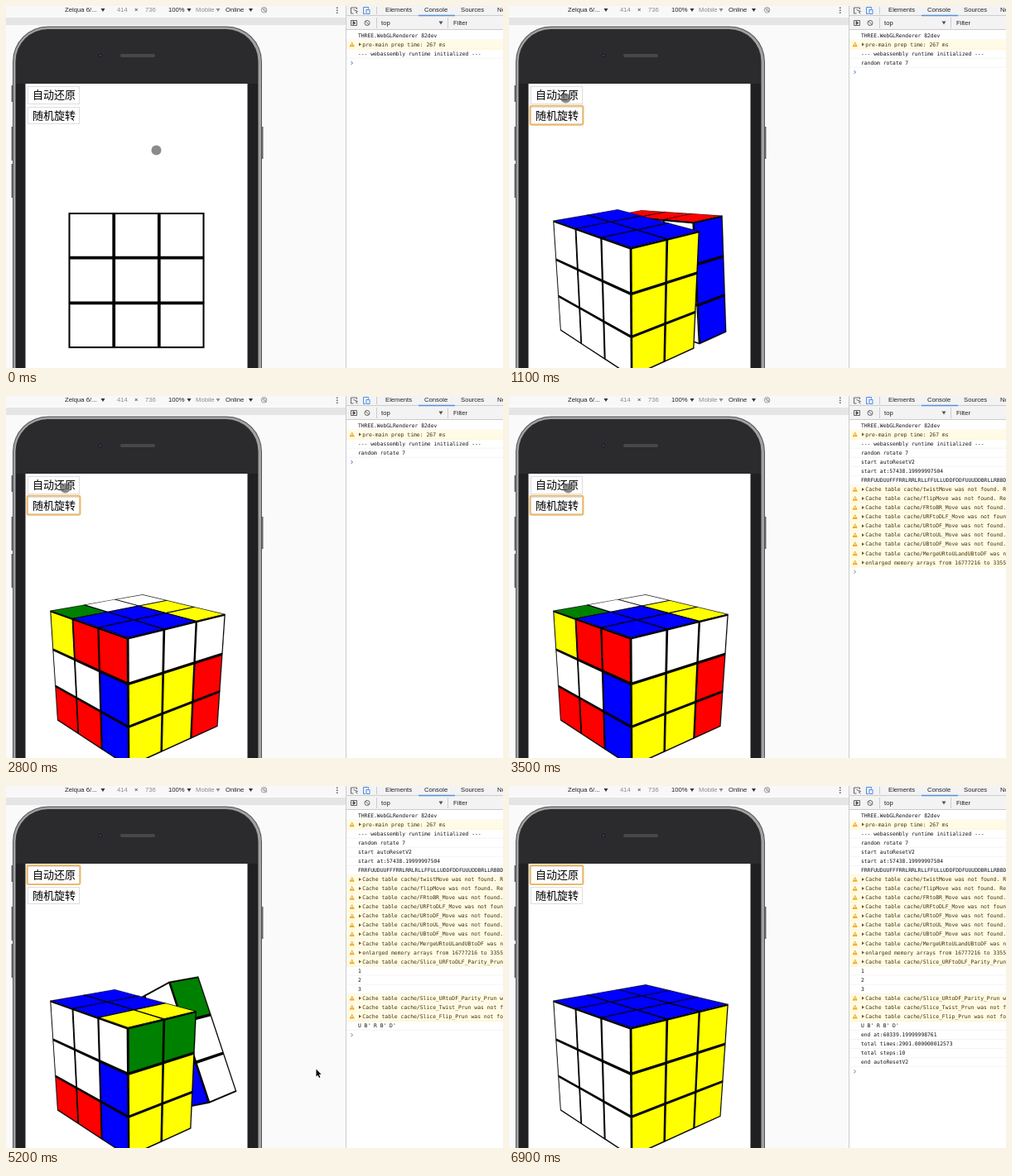
Recreate the animation shown at these times as an HTML page with a canvas. Size 600 by 438 pixels, loop 7 s.

```html
<!DOCTYPE html>
<html lang="zh">
<head>
<meta charset="utf-8">
<style>
html, body { margin: 0; width: 100%; height: 100%; overflow: hidden; background: #fff; }
svg, canvas { position: absolute; left: 0; top: 0; width: 600px; height: 438px; }
text { font: 7.7px "Liberation Sans", Arial, sans-serif; fill: #222; white-space: pre; }
#rows text { font: 6.34px "DejaVu Sans Mono", monospace; fill: #111; }
#rows .warn text { font-size: 6.42px; fill: #453000; }
.cn text { font: 13px "Noto Sans CJK SC", "Noto Sans CJK", sans-serif; fill: #000; text-anchor: middle; }
text.dim { fill: #8c8c8c; }
</style>
</head>
<body>
<svg viewBox="0 0 600 438">
  <rect width="410" height="438" fill="#fafafa"/>
  <rect width="410" height="12" fill="#f8f8f8"/>
  <rect y="14" width="410" height="9" fill="#e5e5e5"/>
  <text x="71" y="7.2">Zelqua 6/...</text>
  <text x="134" y="7.2" class="dim">414</text>
  <text x="155" y="7.2">×</text>
  <text x="168" y="7.2" class="dim">736</text>
  <text x="196" y="7.2">100%</text>
  <text x="229" y="7.2" class="dim">Mobile</text>
  <text x="265" y="7.2">Online</text>
  <path d="M114.500 3h5l-2.500 4zM218.500 3h5l-2.500 4zM293 3h5l-2.500 4z" fill="#333"/>
  <path d="M253.500 3h5l-2.500 4z" fill="#8c8c8c"/>
  <g fill="none" stroke="#888" stroke-width=".8"><circle cx="311.500" cy="4.800" r="3.300"/><path d="M309 2l5.500 5.500M310 4.500l2-2 2 2-2 2z"/></g>
  <path d="M399 1.500h1.500v1.500h-1.500zM399 4.500h1.500v1.500h-1.500zM399 7.500h1.500v1.500h-1.500z" fill="#555"/>

  <path d="M6.500 96h3v20h-3zM6.500 146h3v41h-3zM6.500 191h3v41h-3zM307 146h3.500v39h-3.500z" fill="#666"/>
  <rect x="8" y="24.500" width="301" height="520" rx="43" fill="#555"/>
  <rect x="9" y="25.500" width="299" height="520" rx="42" fill="#a2a2a4"/>
  <rect x="11.500" y="28" width="293" height="520" rx="39" fill="#2b2b2d"/>
  <rect x="12" y="94" width="292" height="344" fill="#202022"/>
  <rect x="138" y="58" width="42" height="4" rx="2" fill="#484848"/>
  <circle cx="114" cy="60" r="2.200" fill="#1c1c26"/><circle cx="114" cy="60" r="1" fill="#4a4a90"/>
  <rect x="23.500" y="94" width="268" height="344" fill="#fff"/>
  <g class="cn">
    <rect x="26.500" y="97.500" width="62" height="21" fill="#fff" stroke="#ddd"/>
    <rect x="26.500" y="122.500" width="62" height="20" fill="#fff" stroke="#ddd"/>
    <rect id="focus" x="25.500" width="64" height="23" rx="2" fill="none" stroke="#ebba68" stroke-width="2"/>
    <text x="58" y="112.300">自动还原</text>
    <text x="58" y="136.500">随机旋转</text>
  </g>

  <rect x="411" width="189" height="438" fill="#fff"/>
  <rect x="411" width="189" height="28.500" fill="#f3f3f3"/>
  <path d="M410.500 0v438M411 11.500h189M411 28.500h189M447.500 1v9M447.500 14v13M533.500 14v13" stroke="#ccc"/>
  <path d="M498 11.500h44" stroke="#5590d9" stroke-width="1.500"/>
  <g fill="none" stroke="#555" stroke-width=".9">
    <path d="M423.500 4v-2h-7v7h3M419.500 4.500l5 2-2.200.8 2 2"/>
    <path d="M416.500 17.500h7v6h-7z"/><path d="M419 18.500l3 2-3 2z" fill="#555"/>
    <circle cx="436" cy="20.500" r="3"/><path d="M433.900 18.400l4.200 4.200"/>
    <path d="M434 9.500h-2.500v-8h6v2M435 4.500h4v5h-4z" stroke="#3b82e8"/>
  </g>
  <text x="458" y="7">Elements</text><text x="505" y="7">Console</text>
  <text x="549" y="7">Sources</text><text x="593" y="7">Network</text>
  <text x="453" y="22.800">top</text><text x="540" y="22.800">Filter</text>
  <path d="M522.500 18.500h5l-2.500 4z" fill="#555"/>
  <g id="rows"></g>
  <path id="prompt" d="M416.500 -2l2 2-2 2" fill="none"/>
</svg>
<canvas id="stage" width="600" height="438"></canvas>
<script>
const LOOP = 7000, STEP = 100, TURN = 223.5, ROW = 11.06;
const $ = id => document.getElementById(id);
const ctx = $('stage').getContext('2d');
const clamp = x => Math.max(0, Math.min(1, x));

// Console: [time, text]; a leading "!" marks a warning
const missing = name => `!Cache table cache/${name} was not found. Recompute it.`;
const log = [
  [0, 'THREE.WebGLRenderer 82dev'],
  [0, '!pre-main prep time: 267 ms'],
  [0, '--- webassembly runtime initialized ---'],
  [880, 'random rotate 7'],
  [3040, 'start autoResetV2'],
  [3040, 'start at:57438.19999997504'],
  [3040, 'FRRFUUDUUFFFRRLRRLRLLFFULLUDDFDDFUUUDDBRLLRBBD'],
  ...['twistMove', 'flipMove', 'FRtoBR_Move', 'URFtoDLF_Move', 'URtoDF_Move',
    'URtoUL_Move', 'UBtoDF_Move', 'MergeURtoULandUBtoDF'].map((name, i) => [3100 + i * 50, missing(name)]),
  [3500, '!enlarged memory arrays from 16777216 to 33554432'],
  [3550, missing('Slice_URFtoDLF_Parity_Prun')],
  [3600, '1'], [3600, '2'], [3600, '3'],
  [3700, missing('Slice_URtoDF_Parity_Prun')],
  [4200, missing('Slice_Twist_Prun')],
  [4600, missing('Slice_Flip_Prun')],
  [4800, "U B' R B' D'"],
  [5940, 'end at:60339.19999998761'],
  [5940, 'total times:2901.000000012573'],
  [5940, 'total steps:10'],
  [5940, 'end autoResetV2'],
];
const rowY = i => 35.5 + i * ROW;
$('rows').innerHTML = log.map(([, text], i) => {
  const y = rowY(i), warn = text[0] === '!';
  const mark = warn ? `<rect x="411" y="${y - 5.5}" width="189" height="${ROW}" fill="#fffbe6"/>
    <path d="M414.500 ${y + 2.8}l3.200-6 3.200 6z" fill="#f2ab26"/><path d="M417.700 ${y - 1}v2" stroke="#fff"/>
    <path d="M426 ${y - 2}l3 2-3 2z" fill="#6b5a2a"/>` : '';
  return `<g class="${warn ? 'warn' : ''}">${mark}
    <path d="M411 ${y + 5.5}h189" stroke="${warn ? '#fff0c0' : '#f2f2f2'}" stroke-width=".8"/>
    <text x="${warn ? 430.3 : 425}" y="${y + 2.2}">${text.replace('!', '')}</text></g>`;
}).join('');
const rows = [...$('rows').children];

function drawConsole(t) {
  const count = log.filter(([at]) => at <= t).length;
  rows.forEach((row, i) => row.style.display = i < count ? '' : 'none');
  $('prompt').setAttribute('transform', `translate(0 ${rowY(count) + 0.3})`);
  $('prompt').setAttribute('stroke', t < 3040 ? '#3a6fe0' : '#777');
}

// Cube: scramble, then solve
const FACES = { R: [0, 1], L: [0, -1], U: [1, 1], D: [1, -1], F: [2, 1], B: [2, -1] };
const COLORS = [['#f00', '#ff0'], ['#008000', '#00f'], ['#ffa500', '#fff']];
const sequence = (start, text) => text.split(' ').map((name, i) => {
  const [axis, layer] = FACES[name[0]];
  return { axis, layer, start: start + i * TURN, angle: (name[1] ? 1 : -1) * layer * Math.PI / 2 };
});
const moves = [...sequence(894, "B' B D B R' B U'"), ...sequence(4824, "U B' R B' D'")];

const dot = (a, b) => a[0] * b[0] + a[1] * b[1] + a[2] * b[2];
const add = (a, b, k) => a.map((x, i) => x + b[i] * k);
function rotate(v, axis, angle) {
  const i = (axis + 1) % 3, j = (axis + 2) % 3, c = Math.cos(angle), s = Math.sin(angle);
  const out = [...v];
  out[i] = v[i] * c - v[j] * s;
  out[j] = v[i] * s + v[j] * c;
  return out;
}

function cubieAt(home, t) {
  let parts = [home, [1, 0, 0], [0, 1, 0], [0, 0, 1]], layer = 0;
  for (const m of moves) {
    const p = clamp((t - m.start) / TURN);
    if (!p) break;
    if (p < 1) layer = Math.round(parts[0][m.axis]);
    if (Math.round(parts[0][m.axis]) === m.layer)
      parts = parts.map(v => rotate(v, m.axis, m.angle * p));
  }
  return { pos: parts[0], axes: parts.slice(1), layer };
}

function drawCube(t) {
  const view = clamp((t - 100) / 400), az = 0.8683 * view, el = 0.363 * view;
  const sa = Math.sin(az), ca = Math.cos(az), se = Math.sin(el), ce = Math.cos(el);
  const toward = [sa * ce, se, ca * ce], right = [ca, 0, -sa], up = [-sa * se, ce, -ca * se];
  const eye = toward.map(x => x * 12);
  const project = p => {
    const k = 573 / (12 - dot(p, toward));
    return [157.5 + k * dot(p, right), 332 - k * dot(p, up)];
  };
  const quad = (center, u, v, half, color) => {
    ctx.beginPath();
    for (const [a, b] of [[-1, -1], [1, -1], [1, 1], [-1, 1]])
      ctx.lineTo(...project(add(add(center, u, a * half), v, b * half)));
    ctx.closePath();
    ctx.fillStyle = color;
    ctx.fill();
  };

  const turning = moves.find(m => t > m.start && t < m.start + TURN);
  const cubies = [];
  for (let i = 0; i < 27; i++)
    cubies.push(cubieAt([i % 3 - 1, Math.floor(i / 3) % 3 - 1, Math.floor(i / 9) - 1], t));
  const far = c => {
    const d = add(eye, c.pos, -1);
    return dot(d, d) + (turning ? 1e4 * Math.abs(eye[turning.axis] - c.layer) : 0);
  };
  cubies.sort((a, b) => far(b) - far(a));

  ctx.strokeStyle = '#000';
  ctx.lineWidth = 0.3;
  for (const { pos, axes } of cubies)
    for (let k = 0; k < 3; k++)
      for (const sign of [-1, 1]) {
        const center = add(pos, axes[k], sign / 2);
        if (sign * dot(axes[k], add(eye, center, -1)) <= 0) continue;
        const u = axes[(k + 1) % 3], v = axes[(k + 2) % 3];
        quad(center, u, v, 0.5, '#000');
        ctx.stroke();
        quad(center, u, v, 0.466, COLORS[k][(sign + 1) / 2]);
      }
}

// Pointer: [time, x, y]; a touch dot over the device, an arrow elsewhere
const path = [[0, 181, 174], [100, 181, 174], [500, 144, 201], [800, 57, 132], [900, 57, 132],
  [1100, 68, 111], [1900, 71, 111], [3900, 71, 111], [4300, 228, 181], [4700, 375, 343],
  [5800, 375, 343], [6300, 400, 450], [LOOP, 400, 450]];

function drawPointer(t) {
  const i = path.findIndex(([at]) => at > t), [t0, x0, y0] = path[i - 1], [t1, x1, y1] = path[i];
  const k = (t - t0) / (t1 - t0), x = x0 + (x1 - x0) * k, y = y0 + (y1 - y0) * k;
  if (x < 300) {
    ctx.beginPath();
    ctx.arc(x + 0.5, y + 0.5, 6, 0, 7);
    ctx.fillStyle = 'rgba(90,90,90,.7)';
    ctx.fill();
    return;
  }
  const arrow = new Path2D('M0 0v9l2-1.800 1.500 3.300 1.400-.6-1.500-3.300h2.700z');
  ctx.save();
  ctx.translate(x - 0.5, y - 0.5);
  ctx.strokeStyle = '#fff';
  ctx.lineWidth = 1.4;
  ctx.stroke(arrow);
  ctx.fillStyle = '#000';
  ctx.fill(arrow);
  ctx.restore();
}

function frame() {
  const t = Math.floor(performance.now() % LOOP / STEP) * STEP;
  ctx.clearRect(0, 0, 600, 438);
  drawConsole(t);
  $('focus').setAttribute('y', t < 4800 ? 120.8 : 96);
  $('focus').style.display = t < 850 ? 'none' : '';
  drawCube(t);
  drawPointer(t);
  requestAnimationFrame(frame);
}
frame();
</script>
</body>
</html>
```
